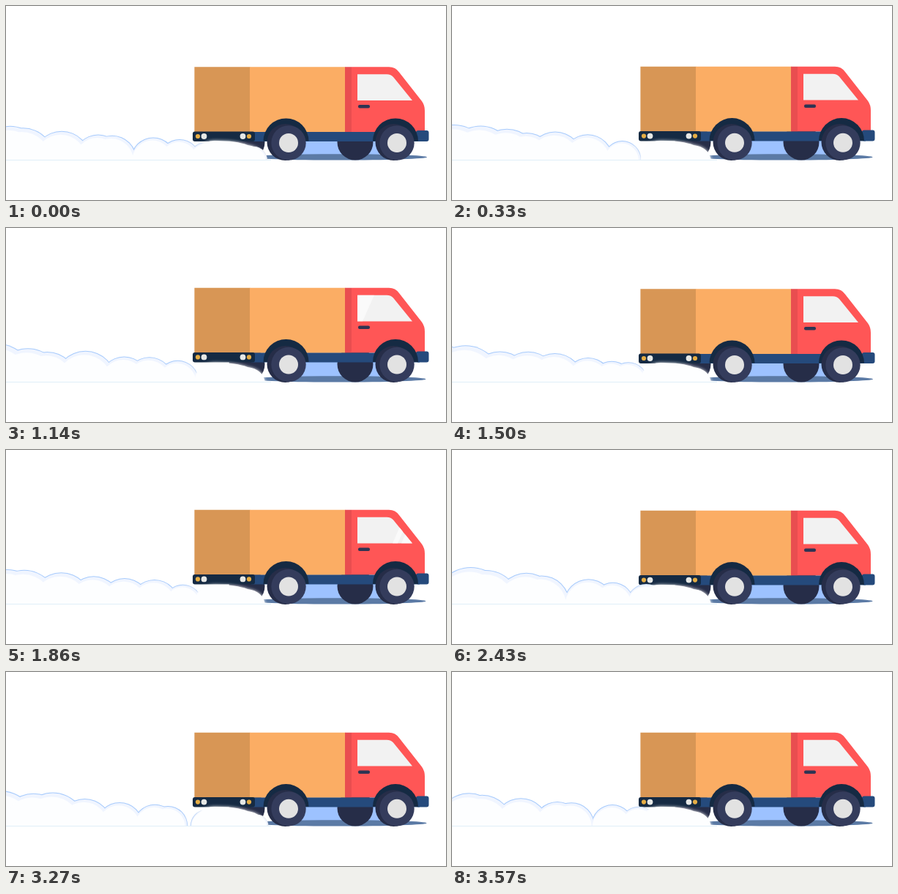
An HTML page with a canvas for the animation above (3.6 s loop, 601x265 px).

```html
<!DOCTYPE html>
<html lang="en">
<head>
<meta charset="utf-8">
<title>Delivery truck</title>
<style>
  html, body { margin: 0; width: 100%; height: 100%; overflow: hidden; background: #fff; }
  canvas { display: block; }
</style>
</head>
<body>
<canvas id="stage" width="601" height="265"></canvas>
<script>
const ctx = document.getElementById('stage').getContext('2d');
const LOOP = 3600, BOB = 300, GLINT = 900, FRAME = 30;
const GROUND = 210, EXHAUST_X = 352, DRIFT = 0.6, PUFFS = 54;
const TAU = Math.PI * 2;
const NAVY = '#152a43', CHASSIS = '#254a7c', TYRE = '#262d48';

function seeded(seed) {
  return () => (seed = seed * 16807 % 2147483647) / 2147483647;
}

// Puffs leave the exhaust at a slightly uneven beat and in uneven sizes.
const random = seeded(4271);
const puffs = Array.from({ length: PUFFS }, (_, i) => ({
  birth: (i + 0.7 * (random() - 0.5)) * LOOP / PUFFS,
  size: 0.88 + 0.2 * random()
}));

// A puff grows quickly at first and stops growing near the left edge.
function puffRadius(x) {
  const travelled = Math.min(1, (EXHAUST_X - x) / EXHAUST_X);
  return 15 + 34 * Math.pow(travelled, 0.9);
}

function disc(x, y, r, color) {
  ctx.fillStyle = color;
  ctx.beginPath();
  ctx.arc(x, y, r, 0, TAU);
  ctx.fill();
}

function box(x, y, w, h, color, radius = 0) {
  ctx.fillStyle = color;
  ctx.beginPath();
  ctx.roundRect(x, y, w, h, radius);
  ctx.fill();
}

function shape(path, color) {
  ctx.fillStyle = color;
  ctx.fill(path);
}

const cab = new Path2D('M472 83.2H523Q532 83.2 537 90.5L568 130Q572 135.5 572 143V172H472Z');
const pane = new Path2D('M480 93.2H520Q526 93.2 529 97L555 129H480Z');
const exhaust = new Path2D('M258 212Q258 185 285 184Q315 184 330 190Q352 193 354 212Z');

const smokeEdge = ctx.createLinearGradient(235, 0, 290, 0);
smokeEdge.addColorStop(0, '#a6cafc');
smokeEdge.addColorStop(1, '#e9ebf1');

function drawShadow(lift) {
  box(395, 180, 115, 24, '#9dc2ff');
  ctx.fillStyle = '#5b7aa5';
  ctx.beginPath();
  ctx.ellipse(455, 206.4, 120 - lift, 4.2, 0, 0, TAU);
  ctx.fill();
  disc(329, 186, 24.5, TYRE);
  disc(477, 186, 24.5, TYRE);
}

function slantedBand(left, width) {
  ctx.beginPath();
  ctx.moveTo(left, 129);
  ctx.lineTo(left + 16, 93);
  ctx.lineTo(left + 16 + width, 93);
  ctx.lineTo(left + width, 129);
  ctx.fill();
}

function drawWindow(t) {
  shape(pane, '#f2f2f2');
  ctx.save();
  ctx.clip(pane);
  ctx.fillStyle = '#fafafa';
  const front = 561 - 0.55 * (t % GLINT);
  slantedBand(front, 7);
  slantedBand(front + 12, 46);
  ctx.restore();
}

function arch(x) {
  ctx.fillStyle = NAVY;
  ctx.beginPath();
  ctx.arc(x, 184.5, 31, Math.PI, 0);
  ctx.fill();
}

function drawBody(t, lift) {
  ctx.save();
  ctx.translate(0, -lift);
  box(257.4, 83.2, 76, 89, '#d89655');
  box(333, 83.2, 130.5, 89, '#fbad64');
  shape(cab, '#ff5656');
  box(463, 83.2, 9, 89, '#e94e50');
  drawWindow(t);
  box(481, 135, 16, 4.5, '#2f3453', 2);
  box(335, 172, 230, 13, CHASSIS);
  box(560, 170, 17.5, 15, CHASSIS, 3);
  box(255, 171.5, 85, 13.5, NAVY, 3);
  for (const x of [262, 332]) disc(x, 178, 3.1, '#e5ad45');
  for (const x of [270.5, 323.5]) disc(x, 178, 3.9, '#e6e8e6');
  arch(382.5);
  arch(532);
  ctx.restore();
}

function visiblePuffs(t) {
  return puffs.map(({ birth, size }) => {
    const age = (t - birth + LOOP) % LOOP;
    const x = EXHAUST_X - DRIFT * age;
    return { x, r: size * puffRadius(x) };
  }).filter(p => p.x > -60);
}

function drawSmoke(t) {
  const cloud = visiblePuffs(t);
  ctx.save();
  ctx.beginPath();
  ctx.rect(0, 0, EXHAUST_X + 10, GROUND);
  ctx.clip();
  for (const p of cloud) disc(p.x, GROUND, p.r + 0.5, smokeEdge);
  for (const p of cloud) disc(p.x, GROUND, p.r - 0.5, '#f0f5ff');
  for (const p of cloud) disc(p.x - p.r * 0.04, GROUND + p.r * 0.04, p.r * 0.92, '#fdfeff');
  ctx.shadowColor = '#fff';
  ctx.shadowBlur = 4;
  shape(exhaust, '#fdfeff');
  ctx.restore();
  box(0, GROUND, 362, 1, '#e0eff8');
}

function wheel(x, lift) {
  disc(x - 4.5, 186, 25, TYRE);
  disc(x, 187 - lift, 23.7, '#343c5c');
  disc(x, 187 - lift, 13, '#e2e2e2');
}

function draw(t) {
  const lift = 2.25 * (1 - Math.cos(TAU * t / BOB));
  ctx.fillStyle = '#fff';
  ctx.fillRect(0, 0, 601, 265);
  drawShadow(lift);
  drawBody(t, lift);
  drawSmoke(t);
  wheel(386, lift * 0.3);
  wheel(534, lift * 0.3);
}

const start = performance.now();
function tick() {
  const t = (performance.now() - start) % LOOP;
  draw(Math.floor(t / FRAME) * FRAME);
  requestAnimationFrame(tick);
}
tick();
</script>
</body>
</html>
```
